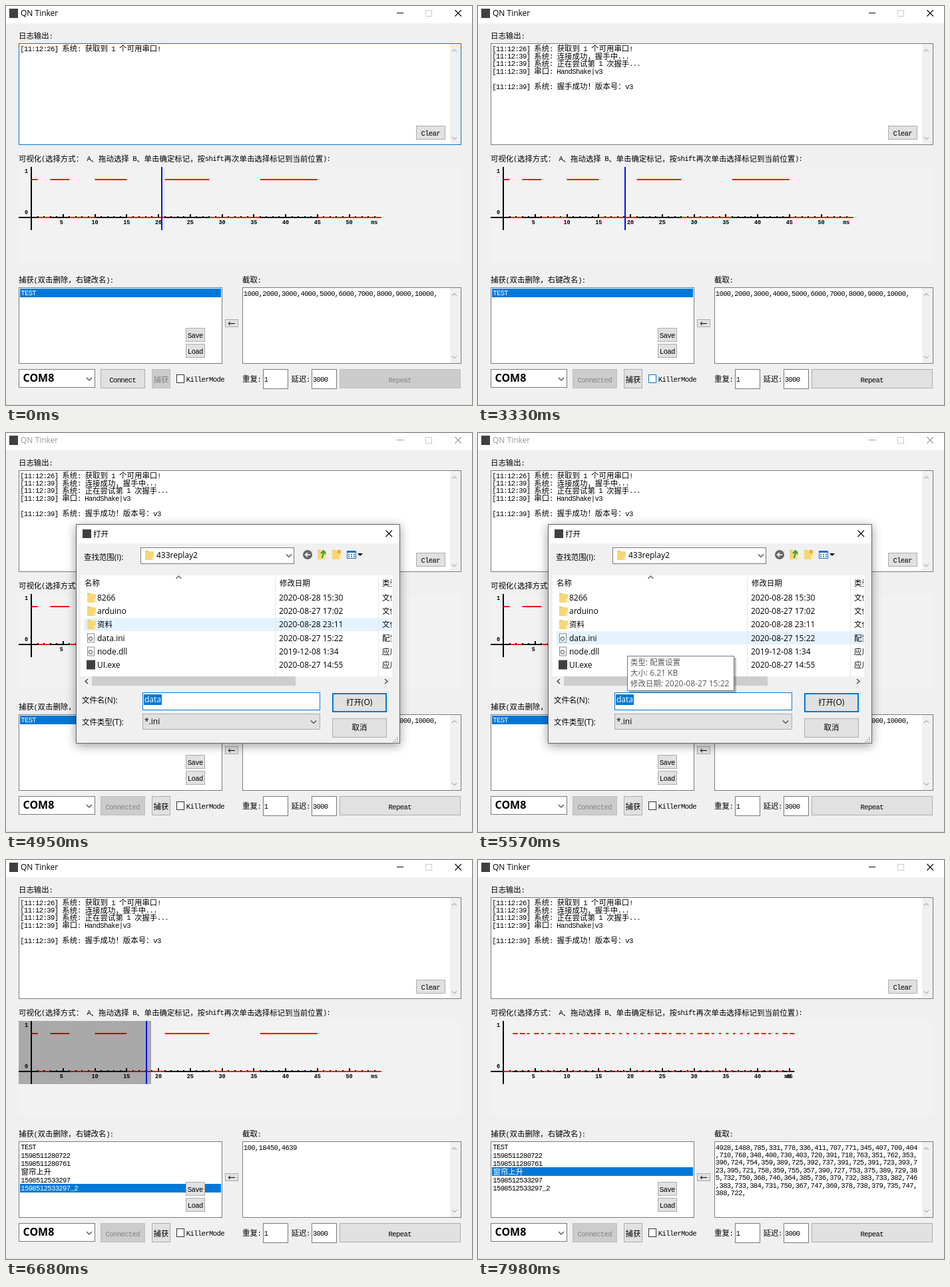
An HTML page with a canvas for the animation above (8 s loop, 700 by 600 pixels).

```html
<!DOCTYPE html>
<html lang="zh-CN">
<head>
<meta charset="utf-8">
<title>QN Tinker</title>
<style>
html, body { margin: 0; width: 100%; height: 100%; overflow: hidden; background: #f0f0f0; }
canvas { display: block; width: 700px; height: 600px; }
</style>
</head>
<body>
<canvas id="stage"></canvas>
<script>
const LOOP = 8000, EM = 11.43, HALF = EM / 2;
const BLUE = '#0078d7', GRAY = '#7a7a7a';
const CJK = '"Noto Sans CJK SC", "Noto Sans CJK", sans-serif';
const MONO = '"Liberation Mono", monospace';
const SANS = '"Open Sans", "Noto Sans", sans-serif';

const canvas = document.getElementById('stage');
const dpr = window.devicePixelRatio || 1;
canvas.width = 700 * dpr;
canvas.height = 600 * dpr;
const g = canvas.getContext('2d');

const DEMO = '1000,2000,3000,4000,5000,6000,7000,8000,9000,10000,';
const CURTAIN = '4928,1488,785,331,778,336,411,707,771,345,407,709,404,' +
  '710,768,348,400,730,403,720,391,718,763,351,762,353,' +
  '396,724,754,359,389,725,392,737,391,725,391,723,393,' +
  '723,395,721,758,359,755,357,390,727,753,375,389,729,' +
  '385,732,750,368,746,364,385,736,379,732,383,733,382,746,' +
  '383,733,384,731,750,367,747,369,378,738,379,735,747,388,722,';
const pulses = text => text.split(',').filter(Boolean).map(Number);
// A second press of the same remote: equal code, slightly different timing
const SIBLING = pulses(CURTAIN).map((v, i) => v + Math.round(6 * Math.sin(i * i * 1.7))).join() + ',';

const ITEMS = ['TEST', '1598511280722', '1598511280761', '窗帘上升', '1598512533297', '1598512533297_2'];
const LOG = [
  [0, 0, '[11:12:26] 系统: 获取到 1 个可用串口!'],
  [2260, 1, '[11:12:39] 系统: 连接成功，握手中...'],
  [2320, 2, '[11:12:39] 系统: 正在尝试第 1 次握手...'],
  [2400, 3, '[11:12:39] 串口: HandShake|v3'],
  [2460, 5, '[11:12:39] 系统: 握手成功！版本号：v3']
];
const FILES = [
  ['dir', '8266', '2020-08-28 15:30', '文件夹'],
  ['dir', 'arduino', '2020-08-27 17:02', '文件夹'],
  ['dir', '资料', '2020-08-28 23:11', '文件夹'],
  ['doc', 'data.ini', '2020-08-27 15:22', '配置设置'],
  ['doc', 'node.dll', '2019-12-08 1:34', '应用程序扩展'],
  ['app', 'UI.exe', '2020-08-27 14:55', '应用程序']
];

// time helpers
const ramp = (t, a, b) => Math.min(1, Math.max(0, (t - a) / (b - a)));
const during = (t, a, b) => t >= a && t < b;
const pulse = (t, a, b, c, d) => ramp(t, a, b) * (1 - ramp(t, c, d));
// value of the last [time, value] step already reached
const step = (t, steps) => steps.reduce((v, s) => t >= s[0] ? s[1] : v, steps[0][1]);

function mix(a, b, k) {
  const part = (c, i) => parseInt(c.substr(1 + 2 * i, 2), 16);
  return 'rgb(' + [0, 1, 2].map(i => Math.round(part(a, i) + (part(b, i) - part(a, i)) * k)) + ')';
}

// drawing helpers
function rect(x, y, w, h, color) {
  g.fillStyle = color;
  g.fillRect(x, y, w, h);
}

function box(x, y, w, h, fill, edge, line = 1) {
  rect(x, y, w, h, edge);
  rect(x + line, y + line, w - 2 * line, h - 2 * line, fill);
}

function stroke(points, color, width = 1) {
  g.strokeStyle = color;
  g.lineWidth = width;
  g.beginPath();
  points.forEach(([x, y]) => g.lineTo(x, y));
  g.stroke();
}

function chevron(x, y, dir, color, size = 4) {
  const d = dir * size / 2;
  stroke([[x - size, y - d], [x, y + d], [x + size, y - d]], color, 1.2);
}

const isWide = ch => ch.charCodeAt(0) > 0x2e80;

// terminal-like grid: full-width characters take two cells
function grid(text, x, y, color = '#000') {
  g.fillStyle = color;
  for (const ch of text) {
    const wide = isWide(ch);
    g.font = wide ? `${EM}px ${CJK}` : `10.6px ${MONO}`;
    g.fillText(ch, x - (wide ? 0 : 0.3), y + (wide ? 4.2 : 3.6));
    x += wide ? EM : HALF;
  }
}

const gridWidth = text => [...text].reduce((w, ch) => w + (isWide(ch) ? EM : HALF), 0);

function label(text, x, y, color = '#000') {
  g.fillStyle = color;
  for (const run of text.match(/[\u2e80-\uffff]+|[^\u2e80-\uffff]+/g)) {
    g.font = isWide(run) ? `${EM}px ${CJK}` : `12px ${SANS}`;
    g.fillText(run, x, y + 4.2);
    x += g.measureText(run).width;
  }
}

// hot, press and off run from 0 to 1
function button(x, y, w, h, text, { hot = 0, press = 0, off = 0, ink = off, drop = 1 } = {}) {
  let fill = mix('#e1e1e1', '#e5f1fb', hot), edge = mix('#adadad', BLUE, hot);
  if (press) { fill = '#cce4f7'; edge = '#005499'; }
  if (off) { fill = mix('#e1e1e1', '#cccccc', off); edge = mix('#adadad', '#bfbfbf', off); }
  box(x, y, w, h, fill, edge);
  grid(text, x + (w - gridWidth(text)) / 2, y + h / 2 + drop, mix('#000000', '#838383', ink));
}

function scrollbar(x, y, h) {
  rect(x, y, 16, h, '#f0f0f0');
  chevron(x + 6.5, y + 10, -1, '#b0b0b0', 3.5);
  chevron(x + 6.5, y + h - 9, 1, '#b0b0b0', 3.5);
}

function folder(x, y) {
  rect(x, y, 5, 3, '#e8b64c');
  rect(x, y + 1, 13, 13, '#f7d774');
  rect(x + 10, y + 8, 3, 6, '#ffe9a6');
}

function titleBar(t) {
  const idle = t < 5000 ? ramp(t, 4200, 4330) : 1 - ramp(t, 5990, 6100);
  const ink = mix('#000000', '#999999', idle);
  rect(0, 0, 700, 26, '#fff');
  rect(5, 4, 13, 14, '#404040');
  label('QN Tinker', 22, 11, ink);
  rect(587, 10, 10, 1, ink);
  box(630, 6, 10, 10, '#fff', '#cccccc');
  stroke([[674.5, 6], [684, 15.5]], ink, 1.1);
  stroke([[684, 6], [674.5, 15.5]], ink, 1.1);
}

function logPanel(t) {
  grid('日志输出:', 19, 45);
  box(19, 56, 665, 153, '#fff', t < 2200 ? BLUE : GRAY);
  scrollbar(667, 57, 151);
  for (const [at, row, text] of LOG) if (t >= at) grid(text, 21.5, 64 + row * EM);
  if (during(t, 20, 510) || during(t, 1040, 1560) || during(t, 2080, 2200)) rect(21, 70, 1, 11, '#000');
  button(616, 180, 44, 21, 'Clear');
}

function plot(t) {
  const curtain = t >= 7330;
  const data = curtain ? pulses(CURTAIN).slice(1) : pulses(DEMO);
  const total = data.reduce((a, b) => a + b) / 1000;
  const px = ms => 38 + ms * 9.55;
  const end = px(total);
  const small = (text, x, y) => {
    g.font = `bold 8.5px ${MONO}`;
    g.fillStyle = '#000';
    g.fillText(text, x, y + 3);
  };

  grid('可视化(选择方式： A、拖动选择 B、单击确定标记，按shift再次单击选择标记到当前位置):', 19, 229.5);
  rect(19, 242, 665, 143, '#f2f2f2');
  rect(37, 242, 2, 95, '#000');
  rect(19, 317, end - 19, 2, '#000');
  small('1', 28, 248);
  small('0', 28, 310);

  let ms = 0, high = !curtain;
  for (const d of data) {
    const x = px(ms);
    ms += d / 1000;
    rect(x, high ? 260 : 317, px(ms) - x, 2, '#f00');
    high = !high;
  }
  for (let i = 1; i < total; i++) {
    const major = i % 5 === 0;
    rect(Math.round(px(i)) - 1, major ? 313 : 316, 2, major ? 5 : 2, '#000');
    if (major) small(String(i), px(i) - 5, 324.5);
  }
  small('ms', end - 15, 324.5);

  if (during(t, 6140, 7330)) rect(19, 242, 199, 95, 'rgba(0,0,0,.3)');
  if (!curtain) {
    const x = step(t, [[0, 233], [880, 226], [940, 220], [6080, 230], [6220, 238], [6580, 228], [6630, 219], [6680, 210]]);
    rect(x, 242, 2, 95, '#0010f0');
  }
}

function lists(t) {
  const loaded = t >= 6060;
  const chosen = step(t, [[0, 0], [6060, 5], [7330, 2], [7900, 3]]);
  const text = step(t, [[0, DEMO], [6180, '100,18450,4639'], [7390, SIBLING], [7940, CURTAIN]]);

  grid('捕获(双击删除，右键改名):', 19, 412);
  box(19, 423, 306, 115, '#fff', GRAY);
  (loaded ? ITEMS : ITEMS.slice(0, 1)).forEach((item, i) => {
    const y = 425 + i * 12.4, on = i === chosen;
    if (on) rect(21, Math.round(y), 302, 13, BLUE);
    grid(item, 22.5, y + 6.5, on ? '#fff' : '#000');
  });
  button(270, 484, 29, 21, 'Save');
  const hot = pulse(t, 3520, 3650, 4440, 4660);
  button(270, 508, 29, 21, 'Load', { hot, press: during(t, 4070, 4150) });

  button(329, 471, 20, 12, '');
  stroke([[334, 477.5], [344, 477.5]], '#000');
  stroke([[337, 475], [334, 477.5], [337, 480]], '#000');

  grid('截取:', 355, 412);
  box(355, 423, 329, 115, '#fff', GRAY);
  scrollbar(667, 424, 113);
  for (let i = 0; i * 53 < text.length; i++) grid(text.substr(i * 53, 53), 357, 432 + i * EM);
}

function bottomBar(t) {
  box(19, 546, 115, 28, '#fff', GRAY);
  g.fillStyle = '#000';
  g.font = `bold 16px ${SANS}`;
  g.fillText('COM8', 25.5, 565);
  chevron(125, 561, 1, '#444');

  const linked = t >= 2240;
  button(142, 546, 67, 29, linked ? 'Connected' : 'Connect', {
    hot: t < 1600 ? 0.6 * pulse(t, 980, 1100, 1140, 1220) : ramp(t, 2100, 2150),
    press: during(t, 2170, 2240),
    off: linked ? 1 : 0,
    drop: 1.5
  });
  const state = { off: 1 - ramp(t, 2340, 2460), ink: 1 - ramp(t, 2700, 3060), drop: 1.5 };
  button(219, 546, 28, 29, '捕获', state);

  const hot = pulse(t, 3210, 3290, 3400, 3490);
  box(256, 554, 12, 13, '#fff', mix('#333333', BLUE, hot));
  grid('KillerMode', 271, 561.5);

  grid('重复:', 355, 561);
  box(386, 546, 38, 30, '#fff', GRAY);
  grid('1', 388, 561.5);
  grid('延迟:', 428.5, 561);
  box(459, 546, 38, 30, '#fff', GRAY);
  grid('3000', 461, 561.5);
  button(501, 546, 182, 29, 'Repeat', state);
  rect(0, 599, 700, 1, '#dcdcdc');
}

function toolIcons() {
  g.fillStyle = '#666';
  g.beginPath();
  g.arc(453, 183, 7, 0, 7);
  g.fill();
  stroke([[457, 183], [450, 183]], '#fff', 1.6);
  stroke([[453, 180], [449.5, 183], [453, 186]], '#fff', 1.6);
  folder(468, 176);
  stroke([[475, 188], [477, 179]], '#2f9e35', 2);
  stroke([[473, 181], [477, 177], [480, 182]], '#2f9e35', 2);
  folder(490, 176);
  rect(498, 176, 5, 5, '#f5a93b');
  box(512, 177, 14, 12, '#fff', '#1673c8');
  rect(512, 177, 14, 3, '#1673c8');
  for (let i = 0; i < 6; i++) rect(514 + i % 3 * 4, i < 3 ? 182 : 185, 2, 2, '#3b8ad8');
  g.fillStyle = '#000';
  g.beginPath();
  [[528, 181], [536, 181], [532, 185]].forEach(p => g.lineTo(...p));
  g.fill();
}

function fileIcon(kind, y) {
  if (kind === 'dir') folder(122, y - 7);
  else if (kind === 'app') rect(121, y - 7, 13, 14, '#404040');
  else {
    box(122, y - 7, 11, 14, '#fff', '#8a8a8a');
    g.strokeStyle = '#7b8791';
    g.lineWidth = 1.5;
    g.beginPath();
    g.arc(127, y + 1, 2.6, 0, 7);
    g.stroke();
  }
}

function fileList(t, picked) {
  rect(112, 214, 468, 152, '#fff');
  g.save();
  g.beginPath();
  g.rect(112, 214, 467, 152);
  g.clip();
  if (during(t, 4950, 5030)) rect(117, 278, 462, 20, '#e5f3ff');
  if (picked) box(117, 298, 470, 20, '#cce8ff', '#99d1ff');
  else if (t >= 5030) rect(117, 298, 462, 20, '#e5f3ff');
  rect(404, 215, 1, 151, '#e5e5e5');
  rect(559, 215, 1, 151, '#e5e5e5');
  label('名称', 118, 226);
  label('修改日期', 411, 226);
  label('类型', 565, 226);
  chevron(259.5, 217, -1, '#555');
  FILES.forEach(([kind, name, date, type], i) => {
    const y = 248 + i * 20.1;
    fileIcon(kind, y);
    label(name, 137, y);
    label(date, 410, y);
    label(type, 565, y);
  });
  g.restore();
  rect(112, 366, 468, 15, '#f0f0f0');
  rect(129, 366, 306, 14, '#cdcdcd');
  stroke([[123, 370], [119, 373.5], [123, 377]], '#444', 1.4);
  stroke([[569, 370], [573, 373.5], [569, 377]], '#444', 1.4);
}

function tooltip(t) {
  g.save();
  g.globalAlpha *= ramp(t, 5440, 5560);
  rect(227, 338, 161, 53, 'rgba(0,0,0,.25)');
  box(224, 335, 161, 53, '#fff', '#767676');
  ['类型: 配置设置', '大小: 6.21 KB', '修改日期: 2020-08-27 15:22']
    .forEach((line, i) => label(line, 229, 345 + i * 16, '#575757'));
  g.restore();
}

function dialogButton(y, text, x, edge, line) {
  box(490, y, 82, 29, '#e1e1e1', edge, line);
  label(text, x, y + 14);
}

function dialog(t) {
  const shown = pulse(t, 4210, 4350, 5970, 6060);
  if (!shown) return;
  const picked = t >= 5620;
  const scale = 0.92 + 0.08 * shown;
  g.save();
  g.globalAlpha = shown;
  g.translate(348.5, 302);
  g.scale(scale, scale);
  g.translate(-348.5, -302);

  g.save();
  g.shadowColor = 'rgba(0,0,0,.4)';
  g.shadowBlur = 14 * dpr;
  g.shadowOffsetY = 3 * dpr;
  rect(105, 137, 487, 330, '#666');
  g.restore();
  rect(106, 138, 485, 328, '#f0f0f0');
  rect(106, 138, 485, 28, '#fff');
  rect(115, 145, 13, 13, '#404040');
  label('打开', 131, 152);
  stroke([[570.5, 146.5], [580, 156]], '#000', 1.1);
  stroke([[580, 146.5], [570.5, 156]], '#000', 1.1);

  label('查找范围(I):', 117, 187);
  box(202, 172, 231, 25, '#fff', GRAY);
  folder(209, 177);
  label('433replay2', 226, 184);
  chevron(425, 184.5, 1, '#444');
  toolIcons();
  fileList(t, picked);

  label('文件名(N):', 114, 402);
  box(205, 390, 267, 27, '#fff', BLUE);
  if (!picked) rect(207, 393, 27, 16, BLUE);
  label(picked ? 'data.ini' : 'data', 208, 401, picked ? '#000' : '#fff');
  if (during(t, 5070, 5440)) rect(234, 393, 1, 16, '#000');
  label('文件类型(T):', 114, 435);
  box(205, 422, 267, 24, '#e1e1e1', '#adadad');
  label('*.ini', 208, 434);
  chevron(462, 434.5, 1, '#444');
  dialogButton(391, '打开(O)', 511, BLUE, 2);
  dialogButton(429, '取消', 519.5, '#adadad', 1);
  for (let i = 0; i < 3; i++)
    for (let j = 0; j <= i; j++) rect(587 - j * 3, 457 + i * 3, 2, 2, '#bcbcbc');

  if (t >= 5440 && !picked) tooltip(t);
  g.restore();
}

function draw(t) {
  g.setTransform(dpr, 0, 0, dpr, 0, 0);
  rect(0, 0, 700, 600, '#f0f0f0');
  titleBar(t);
  logPanel(t);
  plot(t);
  lists(t);
  bottomBar(t);
  dialog(t);
}

const start = performance.now();
function tick() {
  draw((performance.now() - start) % LOOP);
  requestAnimationFrame(tick);
}
tick();
</script>
</body>
</html>
```
